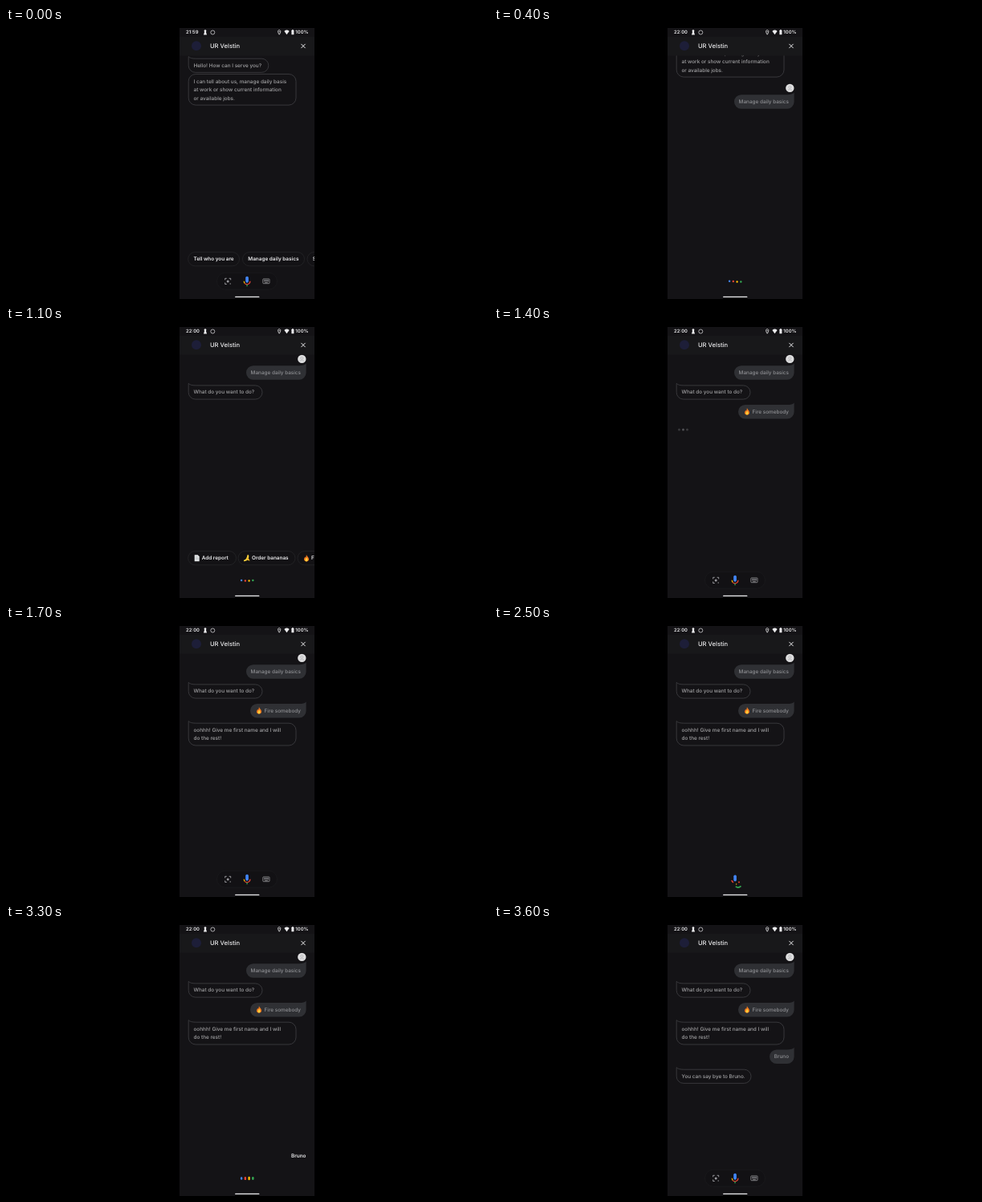
An HTML page with a canvas that plays this animation: 600x338 px, repeating every 4300 ms.

```html
<!DOCTYPE html>
<html lang="en">
<head>
<meta charset="utf-8">
<title>Assistant chat</title>
<style>
  html, body { margin: 0; width: 100%; height: 100%; overflow: hidden; background: #000; }
  canvas { display: block; }
</style>
</head>
<body>
<canvas id="stage" width="600" height="338"></canvas>
<script>
const ctx = document.getElementById('stage').getContext('2d');
const LOOP = 4300, STEP = 100;
const BG = '#141316', BOT_TEXT = '#a3a3a5', USER_TEXT = '#8f9094', WHITE = '#ececee';
const BLUE = '#4285f4', RED = '#ea4335', YELLOW = '#fbbc04', GREEN = '#34a853';
const LINE_HEIGHT = 10.6;
ctx.textRendering = 'geometricPrecision';

// Text is centred vertically on y by its cap height.
function text(str, x, y, { color = WHITE, size = 6.4, weight = 500, align = 'left' } = {}) {
  ctx.font = `${weight} ${size}px Inter, sans-serif`;
  ctx.textAlign = align;
  ctx.fillStyle = color;
  ctx.fillText(str, x, y + size * 0.36);
}

function box(x, y, w, h, r, fill, stroke) {
  ctx.beginPath();
  ctx.roundRect(x, y, w, h, r);
  paint(fill, stroke);
}

function dot(x, y, r, fill, stroke) {
  ctx.beginPath();
  ctx.arc(x, y, r, 0, 7);
  paint(fill, stroke);
}

function paint(fill, stroke, width = 0.8) {
  if (fill) { ctx.fillStyle = fill; ctx.fill(); }
  if (stroke) { ctx.strokeStyle = stroke; ctx.lineWidth = width; ctx.stroke(); }
}

function line(path, stroke, width = 0.8) {
  ctx.strokeStyle = stroke;
  ctx.lineWidth = width;
  ctx.stroke(new Path2D(path));
}

function shape(path, fill) {
  ctx.fillStyle = fill;
  ctx.fill(new Path2D(path));
}

function at(x, y, draw, alpha = 1) {
  ctx.save();
  ctx.globalAlpha *= alpha;
  ctx.translate(x, y);
  draw();
  ctx.restore();
}

// Speech bubble with a small tail at the top; the user's tail is mirrored.
function bubble(left, right, top, bottom, isUser) {
  const w = right - left, h = bottom - top, r = Math.min(9, h / 2);
  ctx.save();
  ctx.translate(isUser ? right : left, top);
  if (isUser) ctx.scale(-1, 1);
  ctx.beginPath();
  ctx.moveTo(0, -2.6);
  ctx.quadraticCurveTo(2, 0, 9, 0);
  ctx.arcTo(w, 0, w, h, r);
  ctx.arcTo(w, h, 0, h, r);
  ctx.arcTo(0, h, 0, 0, r);
  ctx.closePath();
  if (isUser) paint('#2f3034'); else paint(null, '#414144');
  ctx.restore();
}

function botLines(lines, y) {
  lines.forEach((s, i) => text(s, 233.5, y + i * LINE_HEIGHT, { color: BOT_TEXT }));
}

function botSays(lines, right, top, alpha = 1) {
  at(0, (1 - alpha) * 5, () => {
    bubble(227.2, right, top, top + 6.6 + lines.length * LINE_HEIGHT, false);
    botLines(lines, top + 8);
  }, alpha);
}

function userSays(str, left, top, icon) {
  bubble(left, 373.6, top, top + 17.6, true);
  text(str, 367, top + 8.4, { color: USER_TEXT, align: 'right' });
  if (icon) at(left + 11, top + 8.4, icon);
}

function typing(y, phase) {
  for (let i = 0; i < 3; i++) dot(230.5 + i * 5, y, 1.5, (i + phase) % 3 ? '#39393c' : '#505054');
}

const page = () => {
  shape('M-3-4H1L3-2V4H-3Z', '#e4e6e8');
  line('M-2-1.5H1M-2 0H2M-2 1.5H2', '#9aa0a6', 0.5);
};
const banana = () => {
  shape('M2-4C3 0 1 4-4 4L-4 2.5C-1 2 0-1 .5-4Z', '#fdd23c');
  shape('M0-1C2 0 3 2 3.5 3.5C1 3 0 2-1 1Z', '#f6bd2b');
};
const flame = () => {
  shape('M0-4.3C.5-2 3.3-1 3 1.8C2.7 5-2.7 5-3 1.8C-3.1 .2-2-.6-1.8-1.7L-1-.6C-.2-1.8-.4-3 0-4.3Z', '#f57c1f');
  shape('M.2-.6C2 1 2 4 0 4S-2 1.7 .2-.6Z', '#fdd23c');
};

function chip(left, right, label, icon) {
  box(left, 279.6, right - left, 17.2, 8.6, '#131215', '#262629');
  if (icon) at(left + 11, 288.3, icon);
  text(label, left + (icon ? 17 : 6.8), 288, { weight: 600 });
}

function statusBar(t) {
  const style = { size: 5.9, weight: 600 };
  text(t < 400 ? '21:59' : '22:00', 224, 5.3, style);
  dot(248, 3.7, 1.4, WHITE);
  shape('M247.3 4H248.7L250 8.4H246Z', WHITE);
  dot(257.3, 5.5, 2.5, null, '#d0d0d2');
  line('M340.2 8.2C338 5 338.2 2.6 340.2 2.6S342.4 5 340.2 8.2Z', WHITE);
  dot(340.2, 4.6, 0.6, WHITE);
  shape('M346.4 4Q349.5 1.2 352.6 4L349.5 8.2Z', WHITE);
  box(355.4, 2.8, 3, 5.5, 0.5, WHITE);
  box(356.2, 2.1, 1.4, 1, 0, WHITE);
  text('100%', 376.5, 5.3, { ...style, align: 'right' });
}

function header() {
  box(216, 0, 168, 11, 0, BG);
  box(216, 11, 168, 23.6, 0, '#18181a');
  dot(237, 22.3, 6, '#1d1e38');
  text('UR Velstin', 254, 22.3, { size: 7.6 });
  line('M367.4 19.9L372.6 25.1M372.6 19.9L367.4 25.1', WHITE, 1);
}

function greeting() {
  botSays(['Hello! How can I serve you?'], 326.8, 38.2);
  box(227.2, 57.5, 133.8, 38.6, 9, null, '#414144');
  botLines(['I can tell about us, manage daily basis', 'at work or show current information', 'or available jobs.'], 66.2);
}

function conversation(t) {
  dot(368.3, 39.9, 5.2, '#dededf');
  dot(368.3, 38.8, 1.5, null, '#b4b4b6');
  line('M365.6 42.5Q368.3 40.2 371 42.5', '#b4b4b6');
  userSays('Manage daily basics', 299, 48.2);

  if (t >= 700) botSays(['What do you want to do?'], 319, 72.9, t < 800 ? 0.4 : 1);
  else if (t >= 500) typing(79, t / STEP);

  if (t >= 1300) userSays('Fire somebody', 304, 97, flame);

  if (t >= 1600) botSays(['oohhh! Give me first name and I will', 'do the rest!'], 361, 121.2, t < 1700 ? 0.5 : 1);
  else if (t >= 1400) typing(128, t / STEP);

  if (t >= 3400) userSays('Bruno', 343, 155.4);
  if (t >= 3500) botSays(['You can say bye to Bruno.'], 320, 180.2, t < 3600 ? 0.4 : 1);
}

// The first reply pushes the greeting up under the header.
function greetingScroll(t) {
  const shift = t < 400 ? 0 : 35;
  at(0, -shift, greeting);
  if (shift) at(0, 70 - shift, () => conversation(t));
}

function chips(t) {
  if (t < 400) {
    chip(226.7, 290.5, 'Tell who you are');
    chip(294.5, 371.5, 'Manage daily basics');
    chip(375, 450, 'Show jobs');
  } else if (t >= 700 && t < 1200) {
    chip(226.7, 286.5, 'Add report', page);
    chip(289, 360, 'Order bananas', banana);
    chip(363, 432, 'Fire somebody', flame);
  }
}

function mic() {
  box(298.2, 309.7, 3.7, 8, 1.85, BLUE);
  line('M296.2 315.8Q296.3 317.5 297.3 318.6', YELLOW, 1.2);
  line('M297.3 318.6C299.6 320.9 303.9 319.6 303.9 315.8', RED, 1.2);
  line('M300.05 319.8V322.2', GREEN, 1.2);
}

function micBreaking() {
  box(298.3, 310.5, 3.6, 8, 1.8, BLUE);
  line('M295.8 317.2Q296.4 319 298 319.8', RED, 1.5);
  dot(305, 319.6, 1, RED);
  dot(301.6, 322, 0.7, YELLOW);
  line('M300.8 324.8Q304 327.4 307.5 324.4', GREEN, 1.7);
}

function controls() {
  const gray = '#97979b';
  box(262.5, 305.3, 75, 20.8, 10.4, '#121114', '#1b1b1d');
  line('M272.7 314.3V312.3H274.7M277.7 312.3H279.7V314.3M272.7 317.5V319.5H274.7', gray, 1);
  dot(276.2, 316, 1.5, gray);
  dot(279.2, 319, 0.7, gray);
  box(319.8, 312.9, 8.2, 5.8, 0.8, null, gray);
  line('M321 314.6H327M321 316H327', gray);
  line('M322.2 317.6H325.8', gray, 0.7);
  mic();
}

function listening(t, loud) {
  [BLUE, RED, YELLOW, GREEN].forEach((color, i) => {
    const wave = Math.sin(t / 90 + i * 1.4);
    const h = loud ? 4 + wave * 0.6 : 2.4;
    const y = loud ? 316 : 316.2 + wave * 0.4;
    box(291.9 + i * 4.75, y - h / 2, 2.4, h, 1.2, color);
  });
}

function footer(t) {
  const within = (from, to) => t >= from && t < to;
  if (t === 2500) micBreaking();
  else if (within(300, 500) || within(1100, 1300) || within(2600, 3400)) listening(t, within(2900, 3400));
  else controls();
  if (within(3000, 3400)) text('Bruno', 373.5, 288, { weight: 600, align: 'right' });
  box(285, 334.7, 30.5, 1.3, 0.65, WHITE);
}

function draw(now) {
  const t = Math.floor((now % LOOP) / STEP) * STEP;
  ctx.fillStyle = '#000';
  ctx.fillRect(0, 0, 600, 338);
  ctx.save();
  ctx.beginPath();
  ctx.rect(216, 0, 168, 338);
  ctx.clip();
  ctx.fillStyle = BG;
  ctx.fillRect(216, 0, 168, 338);
  if (t < 500) greetingScroll(t); else conversation(t);
  chips(t);
  footer(t);
  header();
  statusBar(t);
  ctx.restore();
  requestAnimationFrame(draw);
}

requestAnimationFrame(draw);
</script>
</body>
</html>
```
